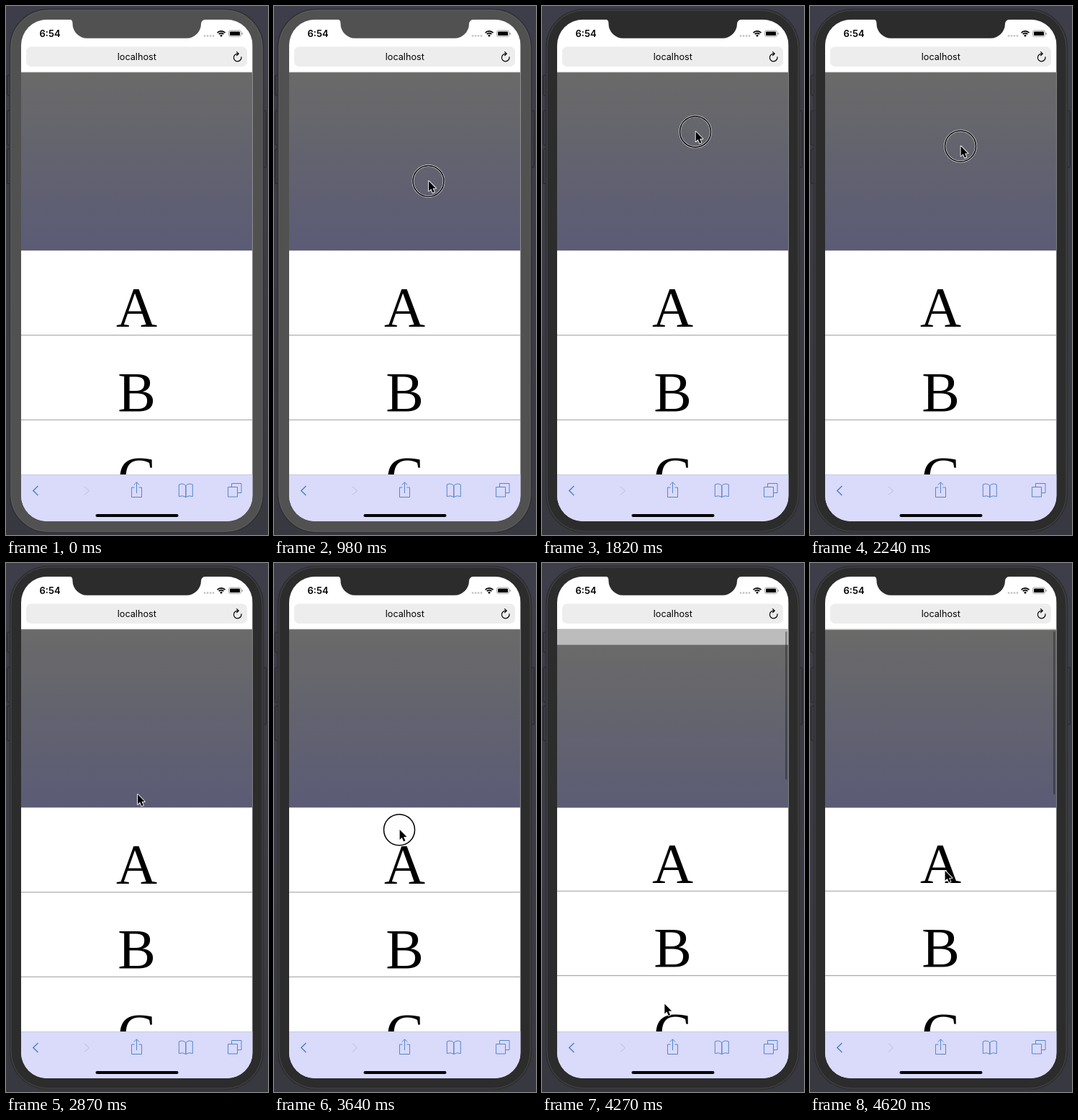
Animation, 364 px wide and 734 px high, one loop 4690 ms. Source, as an HTML page with a canvas:

```html
<!DOCTYPE html>
<html lang="en">
<head>
<meta charset="utf-8">
<title>Phone overscroll</title>
<style>
html, body { margin: 0; width: 364px; height: 734px; overflow: hidden; background: #3e3e4a; }
canvas { display: block; width: 364px; height: 734px; }
</style>
</head>
<body>
<canvas id="stage"></canvas>
<script>
const W = 364, H = 734, LOOP = 4690, STEP = 70;
const LEFT = 21, TOP = 18.7, WIDTH = 321.6, BOTTOM = 715;
const HEAD = 92, HEAD_H = 247.5, BAR = 650, MID = LEFT + WIDTH / 2;
const canvas = document.getElementById('stage');
const dpr = window.devicePixelRatio || 1;
canvas.width = W * dpr;
canvas.height = H * dpr;
const c = canvas.getContext('2d');
c.scale(dpr, dpr);

const SANS = 'Inter, Roboto, sans-serif';
const SERIF = '"Liberation Serif", "Times New Roman", serif';
const BLUE = '#5288c6';

const smooth = k => k * k * (3 - 2 * k);
const sineOut = k => Math.sin(k * Math.PI / 2);
const cubicIn = k => k ** 3;

// Pointer gestures, each continuing from the one before
const ENTER = 560, RELEASE = 3990, PULL_FROM = 371;
const origin = { x: 190, y: 300 };
const moves = [
  { from: ENTER, to: 700, x: 214.5, y: 243, ease: sineOut },
  { from: 1120, to: 1960, x: 213, y: 172, ease: sineOut },
  { from: 1960, to: 2380, x: 199.5, y: 248, ease: cubicIn },
  { from: 2520, to: 3080, x: 174.5, y: 355, ease: smooth },
  { from: 3585, to: RELEASE, x: 165.5, y: 657.5, ease: smooth },
  { from: 4130, to: 4620, x: 187, y: 427, ease: smooth }
];

function pointer(t) {
  let { x, y } = origin;
  for (const m of moves) {
    const k = m.ease(Math.min(1, Math.max(0, (t - m.from) / (m.to - m.from))));
    x += (m.x - x) * k;
    y += (m.y - y) * k;
  }
  return { x, y };
}

// Rubber band while held, critically damped spring afterwards
function overscroll(t) {
  const held = Math.min(t, RELEASE);
  const drag = Math.max(0, pointer(held).y - PULL_FROM);
  const stretch = HEAD_H * (1 - 1 / (drag * 0.75 / HEAD_H + 1));
  const s = (t - held) * 0.011;
  return stretch * (1 + s) * Math.exp(-s);
}

function box(x, y, w, h, r, fill, stroke, lw = 1) {
  c.beginPath();
  c.roundRect(x, y, w, h, r);
  if (fill) { c.fillStyle = fill; c.fill(); }
  if (stroke) { c.strokeStyle = stroke; c.lineWidth = lw; c.stroke(); }
}

function rect(x, y, w, h, fill) {
  c.fillStyle = fill;
  c.fillRect(x, y, w, h);
}

function line(d, color, lw = 1) {
  c.strokeStyle = color;
  c.lineWidth = lw;
  c.stroke(new Path2D(d));
}

function arc(x, y, r, a, b, color, lw) {
  c.beginPath();
  c.arc(x, y, r, a, b);
  c.strokeStyle = color;
  c.lineWidth = lw;
  c.stroke();
}

function dot(x, y, r, fill) {
  c.beginPath();
  c.arc(x, y, r, 0, 7);
  c.fillStyle = fill;
  c.fill();
}

function text(s, y, font, x = MID) {
  c.font = font;
  c.fillStyle = '#000';
  c.textAlign = 'center';
  c.fillText(s, x, y);
}

function fade(y, h, from, to) {
  const g = c.createLinearGradient(0, y, 0, y + h);
  g.addColorStop(0, from);
  g.addColorStop(1, to);
  return g;
}

function drawCase(body, edge) {
  rect(0, 0, W, H, fade(0, H, '#3e3e4a', '#383840'));
  const button = (x, y, h) => box(x, y, 5, h, 1.5, '#3a3a42', '#25252a');
  button(1.5, 96, 28);
  button(1.5, 145, 48);
  button(1.5, 198.5, 48);
  button(356.5, 145, 79);
  box(5.5, 4.5, 352, 726, 53, body, '#303035', 1.5);
  box(7, 6, 349, 723, 51.5, null, edge);
}

function drawNotch(body) {
  const l = 92.5, r = 271, bottom = 44.7;
  c.beginPath();
  c.moveTo(l - 7, TOP - 1);
  c.arcTo(l, TOP, l, bottom, 6);
  c.arcTo(l, bottom, r, bottom, 20);
  c.arcTo(r, bottom, r, TOP, 20);
  c.arcTo(r, TOP, r + 7, TOP, 6);
  c.lineTo(r + 7, TOP - 1);
  c.fillStyle = body;
  c.fill();
}

function drawStatus() {
  text('6:54', 42.7, '600 13px ' + SANS, 61);
  for (let i = 0; i < 4; i++) dot(276 + i * 4, 41.5, 1.4, '#c8c8c8');
  for (const r of [4.3, 7.2])
    arc(299, 42, r, -Math.PI * 0.77, -Math.PI * 0.23, '#000', 1.8);
  dot(299, 41, 1.5, '#000');
  box(309.5, 34, 17, 8.5, 2.3, null, '#999', 0.9);
  box(311, 35.4, 14, 5.7, 1.2, '#000');
  box(327.6, 36.8, 1.3, 3, 0.7, '#999');
}

function drawAddress() {
  box(28, 56.5, 307, 27.5, 7, '#ededee');
  text('localhost', 75, '400 12.7px ' + SANS);
  arc(321.7, 71.5, 5.3, -0.2, Math.PI * 1.53, '#000', 1.2);
  line('M320.2 63.4l3 2.8l-3 2.8', '#000', 1.2);
}

function drawHeader(over, scrolling) {
  c.save();
  c.beginPath();
  c.rect(LEFT, HEAD, WIDTH, HEAD_H);
  c.clip();
  rect(LEFT, HEAD, WIDTH, HEAD_H, '#bcbcbc');
  const y = HEAD + over;
  rect(LEFT, y, WIDTH, HEAD_H, fade(y, HEAD_H, '#6a6a69', '#5b5b76'));
  if (scrolling) box(338, HEAD + 3, 2.5, 227 - over, 1.2, 'rgba(0,0,0,.33)');
  c.restore();
}

function drawList(shift) {
  [...'ABC'].forEach((letter, i) => {
    const y = 444.3 + i * 117.4 + shift;
    text(letter, y, '79px ' + SERIF, 181.5);
    rect(LEFT, y + 12, WIDTH, 1, '#9a9a9a');
  });
}

function drawToolbar() {
  rect(LEFT, BAR, WIDTH, BOTTOM - BAR, '#dadafb');
  rect(LEFT, BAR, WIDTH, 0.6, '#bcbcd2');
  line('M44.5 666l-6.7 6.5l6.7 6.5', '#3f7dbe', 1.3);
  line('M109 667l6.5 5.7l-6.5 5.7', '#c3c7e8', 1.1);
  line('M178.5 668h-4v13.5h14v-13.5h-4M181.5 676v-15m-3.7 3.5l3.7-3.7l3.7 3.7', BLUE);
  for (const side of [-1, 1])
    line(`M249.8 665.5q${side * 4} -4 ${side * 9.5} -1.5v16.5q${side * -5.5} -2 ${side * -9.5} 1z`, BLUE);
  line('M308.5 667.5h13v13.5h-13zM313.5 667v-4.5h13.5v13h-5', BLUE);
  box(124.5, 705, 115, 4, 2, '#000');
}

function drawRing(x, y) {
  arc(x, y, 21.5, 0, 7, 'rgba(255,255,255,.8)', 2.9);
  arc(x, y, 21.5, 0, 7, '#000', 1.5);
}

function drawArrow(x, y) {
  c.save();
  c.translate(x, y);
  c.lineJoin = 'round';
  const arrow = 'M.6 .4V14.2L3.7 11.2L6 16.6L8.4 15.6L6.1 10.4H10.4Z';
  line(arrow, '#fff', 1.8);
  c.fillStyle = '#000';
  c.fill(new Path2D(arrow));
  c.restore();
}

function draw(t) {
  const active = t >= 1120, pulled = t > 3640;
  const body = active ? '#2c2c2c' : '#515151';
  drawCase(body, active ? '#484848' : '#5c5c5c');

  c.save();
  c.beginPath();
  c.roundRect(LEFT, TOP, WIDTH, BOTTOM - TOP, 36);
  c.clip();
  rect(LEFT, TOP, WIDTH, BOTTOM - TOP, '#fff');
  drawStatus();
  drawAddress();
  drawHeader(overscroll(t), pulled);
  drawList(pulled ? -1.6 : 0);
  rect(LEFT, HEAD - 0.4, WIDTH, 0.7, '#a8a8a8');
  drawToolbar();
  c.restore();
  drawNotch(body);

  if (t < ENTER) return;
  const { x, y } = pointer(t);
  const pressed = (t >= 980 && t < 2310) || (t >= 3430 && t < RELEASE);
  if (pressed) drawRing(x, y);
  drawArrow(x, y - 0.5);
}

const start = performance.now();
function tick() {
  const t = (performance.now() - start) % LOOP;
  draw(Math.floor(t / STEP) * STEP);
  requestAnimationFrame(tick);
}
tick();
</script>
</body>
</html>
```
